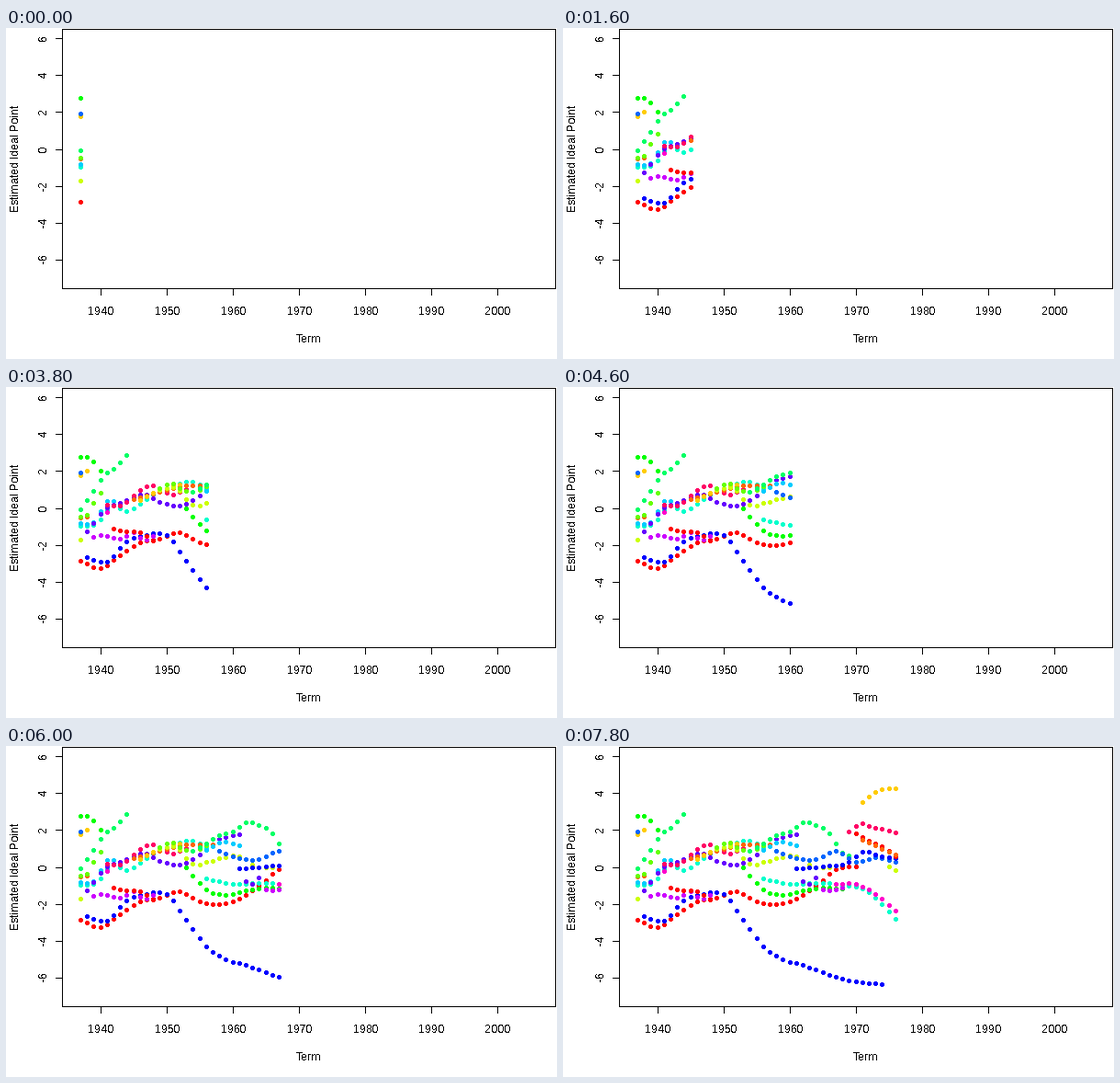
Write a matplotlib script that moves like this. It is 600x360 px and loops after 8000 ms.

```python
import colorsys

import matplotlib.pyplot as plt
import numpy as np
from matplotlib.animation import FuncAnimation

W, H, DPI = 600, 360, 100
PX = 72 / DPI
FIRST, FRAMES, STEP = 1937, 40, 200
HUES = 15

plt.rcParams.update({
    "font.family": "Liberation Sans",
    "font.size": 12 * PX,
    "text.hinting": "force_autohint",
    "text.hinting_factor": 1,
})

fig = plt.figure(figsize=(W / DPI, H / DPI), dpi=DPI, facecolor="white")
ax = fig.add_axes([0, 0, 1, 1])
ax.set_xlim(0, W)
ax.set_ylim(H, 0)
ax.axis("off")


def year_x(year):
    return np.floor(103 + 7.2 * (year - 1940) + 1e-6)


def point_y(value):
    return np.floor(132.1 - 20.07 * value)


def line(x0, y0, x1, y1):
    # Lines snap to the middle of the pixel just past their coordinates.
    ax.plot([x0, x1], [y0, y1], color="black", lw=PX, antialiased=False,
            snap=True, solid_capstyle="projecting")


def label(x, y, text, angle=0):
    ax.text(x, y, text, rotation=angle, rotation_mode="anchor",
            ha="center", va="baseline", antialiased=False)


def draw_axes():
    left, right, top, bottom = 61, 598, 1, 283
    for y in (top, bottom):
        line(left, y, right, y)
    for x in (left, right):
        line(x, top, x, bottom)
    for year in range(1940, 2001, 10):
        x = year_x(year)
        line(x, bottom, x, bottom + 7)
        label(x + 0.5, 312, str(year))
    for value in range(-6, 7, 2):
        y = point_y(value)
        line(left - 7, y, left, y)
        label(44, y - 0.5, str(value), 90)
    label(330, 342, "Term")
    label(14, 141.5, "Estimated Ideal Point", 90)


def smooth(knots, n):
    """Sample n points on a smooth curve through evenly spaced knots."""
    p = np.array(knots, float)
    if len(p) == 1:
        return np.full(n, p[0])
    m = np.gradient(p)
    t = np.linspace(0, len(p) - 1, n)
    k = np.minimum(t.astype(int), len(p) - 2)
    t = t - k
    rise = t * t * (3 - 2 * t)
    return (p[k] + (p[k + 1] - p[k]) * rise
            + m[k] * t * (1 - t) ** 2 - m[k + 1] * t * t * (1 - t))


tracks = []


def track(start, end, *knots):
    """Add one run of yearly dots; colours cycle through the hue wheel."""
    years = np.arange(start, end + 1) + 1900
    y = np.round(smooth(knots, len(years)))
    rgb = colorsys.hsv_to_rgb(len(tracks) % HUES / HUES, 1, 1)
    tracks.append((years, np.column_stack([year_x(years), y]) + 0.5,
                   np.tile(rgb, (len(years), 1))))


track(37, 70, 189, 197, 183, 169, 165, 158, 169, 172, 166, 152, 134, 131)
track(37, 38, 142, 141)
track(37, 38, 96, 91)
track(37, 37, 166)
track(37, 40, 141, 139, 126, 115)
track(37, 40, 76, 77, 91)
track(37, 44, 133, 116, 96, 88, 74)
track(37, 56, 151, 149, 129, 135, 124, 114, 107, 103, 110)
track(37, 45, 148, 147, 124, 126, 121)
track(37, 37, 93)
track(38, 74, 185, 190, 168, 161, 161, 189, 218, 232, 238, 246, 253, 257, 259)
track(38, 61, 157, 132, 124, 117, 126, 129, 117, 101, 96)
track(39, 48, 163, 161, 164, 164, 158, 167, 162)
track(41, 41, 136)
track(41, 53, 128, 128, 113, 107, 117, 111)
track(42, 48, 154, 157, 158, 167)
track(45, 57, 122, 114, 107, 107)
track(46, 52, 123, 112, 106)
track(49, 66, 112, 110, 128, 126, 121, 120, 131, 132)
track(49, 56, 110, 105, 112, 114, 108)
track(53, 68, 132, 156, 162, 157, 154, 155)
track(54, 70, 114, 106, 97, 93, 83, 86, 95, 116, 120)
track(56, 76, 144, 150, 149, 151, 159, 188)
track(56, 61, 113, 104, 108)
track(58, 76, 114, 122, 123, 114, 126, 121, 126)
track(61, 76, 133, 132, 130, 128, 115, 119, 122)
track(62, 64, 147, 150, 143)
track(65, 68, 156, 157, 154)
track(67, 76, 150, 150, 161, 179)
track(69, 76, 93, 84, 88, 90, 94)
track(70, 76, 95, 103, 109, 120)
track(71, 76, 102, 118)
track(71, 76, 61, 48, 46)
track(75, 76, 131, 135)

years, spots, colors = map(np.concatenate, zip(*tracks))

draw_axes()
# Without antialiasing every touched pixel is filled: 4.2 px gives 5 px dots.
dots = ax.scatter([], [], s=(4.2 * PX) ** 2, linewidths=0, antialiased=False,
                  zorder=3)


def update(i):
    # The 1946 and 1947 columns appear together.
    last = FIRST + i + (i == 9)
    shown = years <= last
    dots.set_offsets(spots[shown])
    dots.set_facecolor(colors[shown])
    return (dots,)


anim = FuncAnimation(fig, update, frames=FRAMES, interval=STEP,
                     init_func=lambda: update(0), repeat=True, repeat_delay=0)
plt.show()
```
